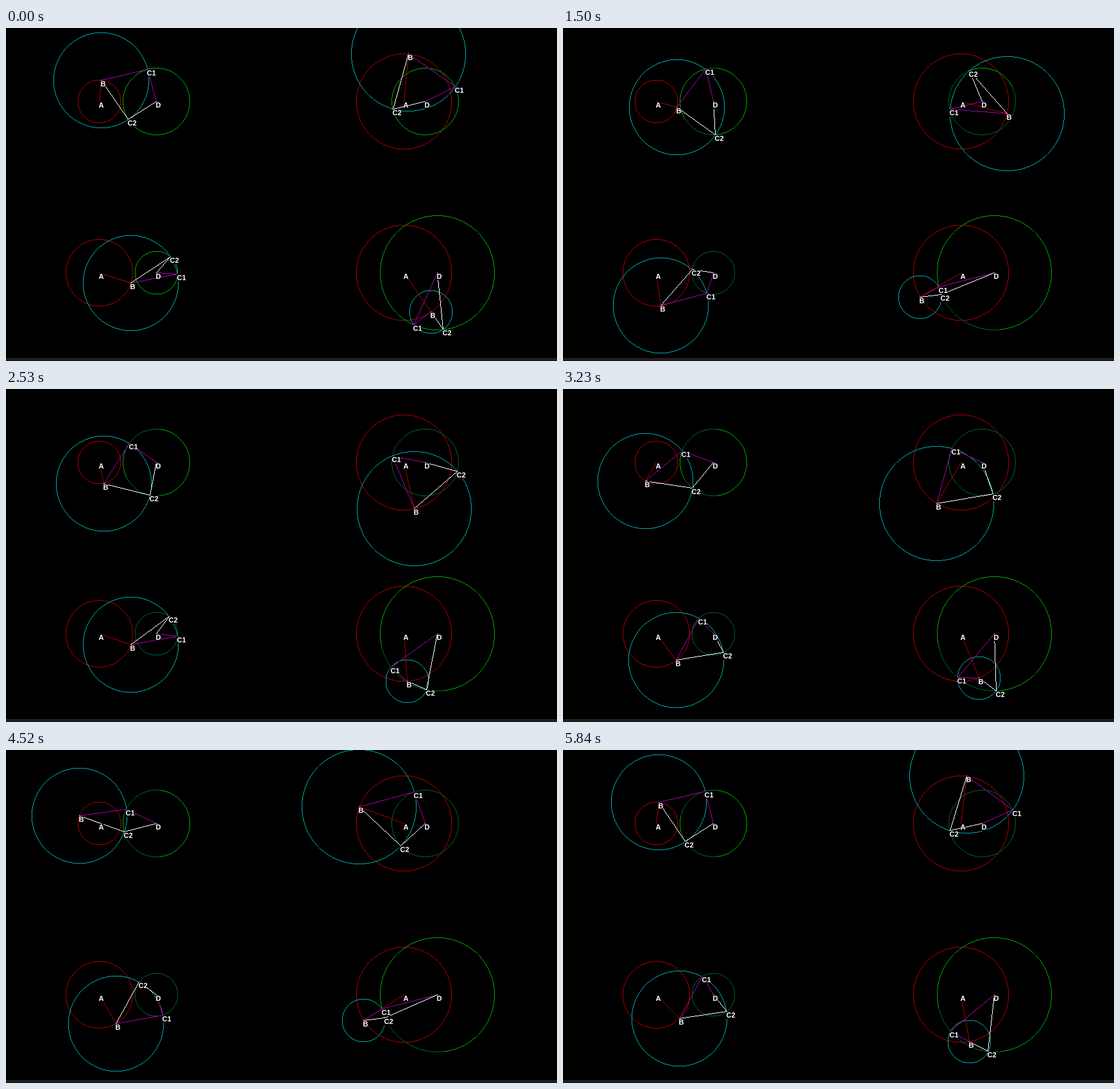
Recreate the animation shown at these times as an HTML page with a canvas. Size 859 by 519 pixels, loop 5910 ms.

```html
<!DOCTYPE html>
<html lang="en">
<head>
<meta charset="utf-8">
<title>Four-bar linkages</title>
<style>
html, body { margin: 0; width: 100%; height: 100%; overflow: hidden; background: #000; }
canvas { display: block; }
</style>
</head>
<body>
<canvas id="stage" width="859" height="519"></canvas>
<script>
const ctx = document.getElementById('stage').getContext('2d');
const LOOP = 5910, FRAMES = 86, STEP = LOOP / FRAMES, LEAD = 20;
const RED = '#a80000', GREEN = '#00a800', DIM = '#005f2a';
const CYAN = '#00a8a8', PURPLE = '#a800a8', WHITE = '#fff';
const BINS = 240, TAU = 2 * Math.PI;

// Degrees turned by the shared drive at a few steps; it slows down slightly
const drive = [[0, 0], [12, 56.6], [22, 99.5], [37, 162.1], [57, 248.2], [75, 322], [85, 361.2]];

function turned(step) {
  const i = drive.findIndex(([s], n) => n > 0 && s >= step);
  const [s0, a] = drive[i - 1], [s1, b] = drive[i];
  return a + (b - a) * (step - s0) / (s1 - s0);
}

const crank = turn => ({ angle: turn - 84.5, side: 1 });

// Swings between two limits at the speed of the drive
const rocker = (low, high, offset, flips) => turn => {
  const span = high - low;
  const p = (turn + offset + 2 * span) % (2 * span);
  return { angle: low + Math.min(p, 2 * span - p), side: flips && p > span ? -1 : 1 };
};

// Bar lengths are whole and half units
const U = 7.42, LEFT = 145.3, RIGHT = 620.35, TOP = 114.4, BOTTOM = 381.4;
const linkage = (x, y, ab, bc, cd, ad, motion) =>
  ({ x, y, ab: ab * U, bc: bc * U, cd: cd * U, ad: ad * U, motion });
const linkages = [
  linkage(LEFT, TOP, 4.5, 10, 7, 12, crank),
  linkage(RIGHT, TOP, 10, 12, 7, 4.5, crank),
  linkage(LEFT, BOTTOM, 7, 10, 4.5, 12, rocker(14.35, 96.1, -3.45, true)),
  linkage(RIGHT, BOTTOM, 10, 4.5, 12, 7, rocker(55.4, 151.9, 0.1, false))
];

function pose(k, step) {
  const { angle, side } = k.motion(turned(step));
  const rad = angle * Math.PI / 180;
  const a = { x: k.x, y: k.y }, d = { x: k.x + k.ad, y: k.y };
  const b = { x: a.x + k.ab * Math.cos(rad), y: a.y + k.ab * Math.sin(rad) };
  const dist = Math.hypot(d.x - b.x, d.y - b.y);
  const ux = (d.x - b.x) / dist, uy = (d.y - b.y) / dist;
  const along = (k.bc ** 2 - k.cd ** 2 + dist ** 2) / (2 * dist);
  const off = Math.sqrt(Math.max(0, k.bc ** 2 - along ** 2));
  const joint = s => ({ x: b.x + along * ux + s * off * uy, y: b.y + along * uy - s * off * ux });
  return { a, b, d, c1: joint(side), c2: joint(-side) };
}

const bin = angle => Math.floor(((angle / TAU) % 1 + 1) % 1 * BINS);

// For each part of the circle round D, the first step at which a joint C passes it
function sweep(k) {
  const first = new Array(BINS).fill(Infinity);
  const last = {};
  for (let step = 0; step < FRAMES; step++) {
    const p = pose(k, step);
    for (const name of ['c1', 'c2']) {
      const angle = Math.atan2(p[name].y - p.d.y, p[name].x - p.d.x);
      const from = last[name] ?? angle;
      const turn = Math.atan2(Math.sin(angle - from), Math.cos(angle - from));
      for (let j = 0; j <= 40; j++) {
        const n = bin(from + turn * j / 40);
        first[n] = Math.min(first[n], step);
      }
      last[name] = angle;
    }
  }
  return first;
}
for (const k of linkages) k.swept = sweep(k);

const dot = (x, y) => ctx.fillRect(x, y, 1, 1);

function line(p, q, color) {
  ctx.fillStyle = color;
  const x = Math.floor(p.x), y = Math.floor(p.y);
  const dx = Math.floor(q.x) - x, dy = Math.floor(q.y) - y;
  const n = Math.max(Math.abs(dx), Math.abs(dy), 1);
  for (let i = 0; i <= n; i++) dot(Math.round(x + dx * i / n), Math.round(y + dy * i / n));
}

function circle(c, r, colorAt) {
  const cx = Math.floor(c.x), cy = Math.floor(c.y);
  const plot = (x, y) => {
    ctx.fillStyle = colorAt(Math.atan2(y, x));
    dot(cx + x, cy + y);
  };
  for (let i = 0; i <= r * Math.SQRT1_2; i++) {
    const j = Math.round(Math.sqrt(r * r - i * i));
    for (const sx of [-1, 1]) for (const sy of [-1, 1]) {
      plot(sx * i, sy * j);
      plot(sx * j, sy * i);
    }
  }
}

function label(text, p) {
  const x = Math.floor(p.x), y = Math.floor(p.y);
  ctx.fillStyle = '#000';
  ctx.fillRect(x, y + 1, text.length > 1 ? 13 : 7, 11);
  ctx.fillStyle = WHITE;
  ctx.fillText(text, x - 0.5, y + 10);
}

function drawLinkage(k, step) {
  const { a, b, c1, c2, d } = pose(k, step);
  circle(a, k.ab, () => RED);
  circle(d, k.cd, angle => step > 0 && k.swept[bin(angle)] <= step ? DIM : GREEN);
  circle(b, k.bc, () => CYAN);
  line(a, b, RED);
  line(b, c1, PURPLE);
  line(c1, d, PURPLE);
  line(b, c2, WHITE);
  line(c2, d, WHITE);
  label('A', a);
  label('B', b);
  label('C1', c1);
  label('C2', c2);
  label('D', d);
}

function draw(step) {
  ctx.fillStyle = '#000';
  ctx.fillRect(0, 0, 859, 519);
  ctx.font = 'bold 11px "Liberation Sans", Arial, sans-serif';
  for (const k of linkages) drawLinkage(k, step);
  ctx.fillStyle = '#1a1a1a';
  ctx.fillRect(0, 515, 859, 4);
  ctx.fillStyle = '#363636';
  ctx.fillRect(0, 515, 859, 1);
}

const start = performance.now();
let shown = -1;
function tick() {
  const t = (performance.now() - start) % LOOP;
  const step = Math.min(FRAMES - 1, Math.floor((t + LEAD) / STEP));
  if (step !== shown) draw(shown = step);
  requestAnimationFrame(tick);
}
draw(shown = 0);
requestAnimationFrame(tick);
</script>
</body>
</html>
```
